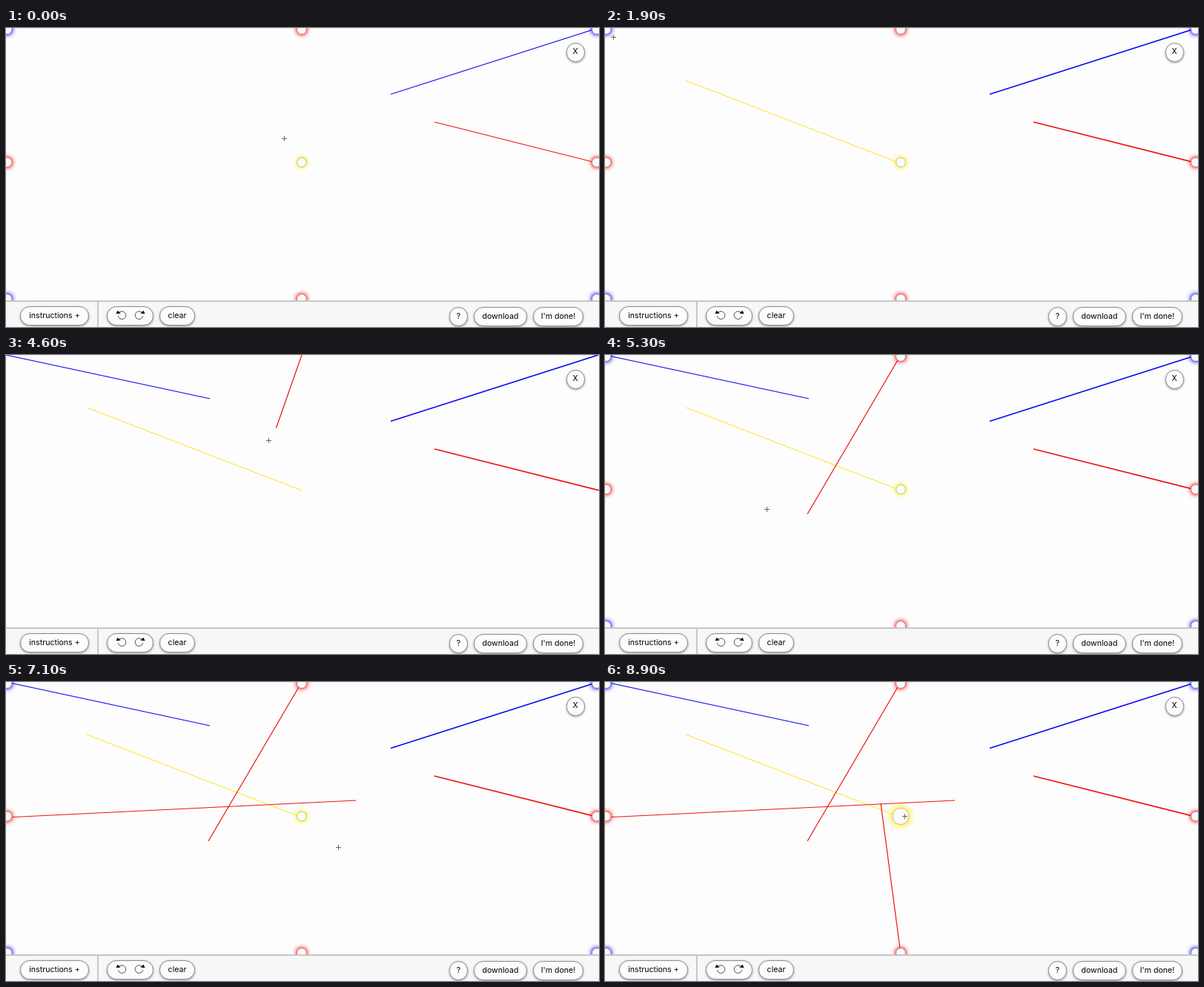
An HTML page with a canvas for the animation above (9 s loop, 800x404 px).

```html
<!DOCTYPE html>
<html lang="en">
<head>
<meta charset="utf-8">
<title>Line drawing</title>
<style>
  html, body { margin: 0; width: 800px; height: 404px; overflow: hidden; background: #fdfdfd; }
  body { position: relative; font: 400 10.6px/1 Inter, sans-serif; color: #000; }
  canvas, svg { position: absolute; left: 0; top: 0; }
  .bar { position: absolute; left: 0; top: 368px; width: 800px; height: 36px; box-sizing: border-box;
         background: #f7f7f7; border-top: 2px solid #c6c6c6; }
  .split { position: absolute; left: 123px; top: 370px; width: 2px; height: 34px; background: #c6c6c6; }
  .btn { position: absolute; box-sizing: border-box; height: 26px; border: 1px solid #8f8f8f; border-radius: 13px;
         background: #fcfcfc; box-shadow: 0 1px 3px rgba(0,0,0,.4);
         display: flex; align-items: center; justify-content: center; white-space: pre; }
</style>
</head>
<body>
<canvas id="stage" width="800" height="404"></canvas>
<div class="bar"></div>
<div class="split"></div>
<div class="btn" style="left:19px;top:376px;width:93px">instructions +</div>
<div class="btn" style="left:136px;top:376px;width:63px"></div>
<div class="btn" style="left:207px;top:376px;width:48px">clear</div>
<div class="btn" style="left:598px;top:377px;width:25px">?</div>
<div class="btn" style="left:631px;top:377px;width:72px">download</div>
<div class="btn" style="left:711px;top:377px;width:68px">I'm done!</div>
<div class="btn" style="left:755.5px;top:19.5px;width:25px">X</div>
<svg width="800" height="404">
  <defs>
    <g id="turn">
      <path d="M-3.6 -3.8A5.3 5.3 0 1 1 -5.2 1.2" fill="none" stroke="#222" stroke-width=".8"/>
      <path d="M-8 -1.8L-6 -6.2L-1.8 -2.4Z"/>
    </g>
  </defs>
  <use href="#turn" transform="translate(156.5 388)"/>
  <use href="#turn" transform="translate(179.5 388) scale(-1 1)"/>
</svg>
<script>
const ctx = document.getElementById('stage').getContext('2d');
const LOOP = 9000, STEP = 100;
const LAG = 40, REST = 50, TRAVEL = 800;
const BLUE = '#0a0af2', RED = '#ee1111', YELLOW = '#ffe43a';
const HOME = [376, 150], LAST = [405, 182];

// bow bends the pointer's way sideways while it draws
const strokes = [
  { from: [399, 183], to: [109, 71], press: 400, release: 1200, color: YELLOW },
  { from: [0, 0], to: [275, 59], press: 3100, release: 4000, color: BLUE },
  { from: [399, 0], to: [273, 215], press: 4200, release: 5020, color: RED, bow: 19 },
  { from: [0, 183], to: [472, 160], press: 6000, release: 6750, color: RED },
  { from: [399, 368], to: [372, 164], press: 7600, release: 8200, color: RED }
];

const nodes = [];
[2, 181.5, 366].forEach((y, row) => [1.5, 399, 797].forEach((x, col) => {
  const odd = (row + col) % 2;
  nodes.push({ x, y, color: odd ? '#ff2020' : row === 1 ? '#ffee20' : '#2020ff' });
}));

const clamp = (v, lo, hi) => Math.max(lo, Math.min(hi, v));
const grab = ([x, y]) => [clamp(x, 2, 797), clamp(y, 7, 363)];

function glide(a, b, t0, t1, t, bow = 0) {
  const p = clamp((t - t0) / (t1 - t0), 0, 1);
  const e = p * p * (3 - 2 * p);
  const dx = b[0] - a[0], dy = b[1] - a[1];
  const side = bow * Math.sin(Math.PI * e) / Math.hypot(dx, dy);
  return [a[0] + dx * e + dy * side, a[1] + dy * e - dx * side];
}

// the pointer alternates between drawing a stroke and going to the next one
function pointer(t) {
  let at = HOME, free = 0;
  for (const s of strokes) {
    const start = grab(s.from);
    if (t < s.press) return glide(at, start, free, Math.min(s.press, free + TRAVEL), t);
    if (t < s.release) return glide(start, s.to, s.press + REST, s.release - REST, t, s.bow);
    at = s.to;
    free = s.release + REST;
  }
  return glide(at, LAST, free, free + TRAVEL / 2, t);
}

function line(a, b, color, width) {
  ctx.strokeStyle = color;
  ctx.lineWidth = width;
  ctx.beginPath();
  ctx.moveTo(...a);
  ctx.lineTo(...b);
  ctx.stroke();
}

function node({ x, y, color }, hover) {
  ctx.save();
  ctx.beginPath();
  ctx.arc(x, y, hover ? 11 : 6.3, 0, Math.PI * 2);
  ctx.shadowColor = ctx.fillStyle = color;
  ctx.shadowBlur = hover ? 10 : 6;
  ctx.fill();
  ctx.fill();
  ctx.restore();
  ctx.fillStyle = '#fafafa';
  ctx.fill();
  ctx.strokeStyle = 'rgba(140,140,140,.5)';
  ctx.lineWidth = 1;
  ctx.stroke();
}

function draw(t) {
  ctx.fillStyle = '#fdfdfd';
  ctx.fillRect(0, 0, 800, 404);
  ctx.fillStyle = '#efefef';
  ctx.fillRect(0, 0, 800, 1);
  ctx.fillRect(0, 0, 1, 404);

  const width = t < strokes[0].press ? 1.2 : 1.7;
  line([519, 89.5], [799, 0], BLUE, width);
  line([578, 127], [800, 183], RED, width);

  let busy = false;
  for (const s of strokes) {
    if (t < s.press) continue;
    const held = t < s.release;
    busy = busy || held;
    line(s.from, held ? pointer(Math.max(s.press, t - LAG)) : s.to, s.color, 1.2);
  }

  const [x, y] = pointer(t);
  if (!busy) nodes.forEach(n => node(n, Math.hypot(n.x - x, n.y - y) < 8));

  const cx = Math.round(x) - .5, cy = Math.round(y) - .5;
  line([cx - 3.5, cy], [cx + 3.5, cy], '#666', 1);
  line([cx, cy - 3.5], [cx, cy + 3.5], '#666', 1);
}

const start = performance.now();
function tick() {
  const t = (performance.now() - start) % LOOP;
  draw(Math.floor(t / STEP) * STEP);
  requestAnimationFrame(tick);
}
tick();
</script>
</body>
</html>
```
